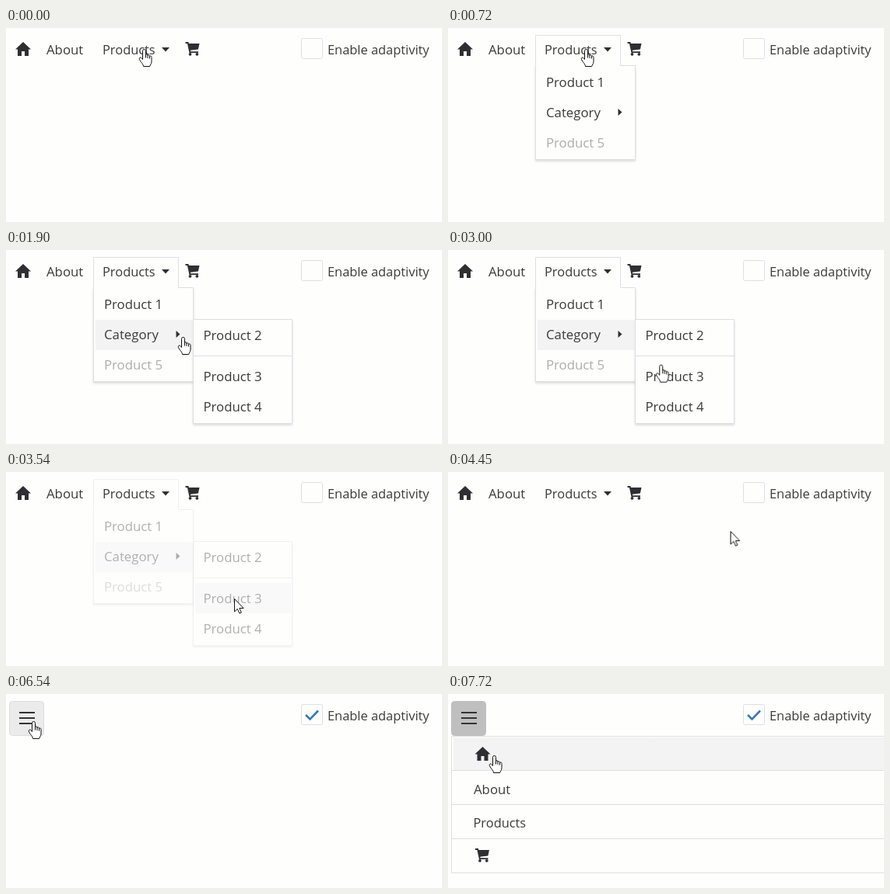
Recreate the animation shown at these times as an HTML page. Size 560 by 250 pixels, loop 8000 ms.

```html
<!DOCTYPE html>
<html lang="en">
<head>
<meta charset="utf-8">
<title>Adaptive menu</title>
<style>
html, body { margin: 0; width: 100%; height: 100%; overflow: hidden; background: #fefefd; }
svg { display: block; width: 560px; height: 250px; }
text { font: 16.8px "Open Sans", "Noto Sans", sans-serif; fill: #3a3a3a; }
.small { font-size: 16.4px; }
.icon { fill: #2f2f33; }
.line { fill: none; stroke: #dfdfe4; }
.panel { fill: #fefefd; stroke: #dfdfe4; }
.hover { fill: #f3f3f4; }
.muted { fill: #adadad; }
.shadow { filter: drop-shadow(0 2px 1.5px #0002); }

/* 1% of the loop is 80 ms */
.anim { animation: 8s linear infinite; }
.step { animation: 8s step-end infinite; }

#cursor { animation-name: travel; }
@keyframes travel {
  0%, 9% { transform: translate(177px, 27px); animation-timing-function: ease-in-out; }
  15.75%, 17.5% { transform: translate(193px, 85px); }
  20.25%, 32.875% { transform: translate(227px, 112px); }
  39.5%, 51.125% { transform: translate(293px, 163px); }
  57.875%, 71.5% { transform: translate(397px, 33px); animation-timing-function: ease-in-out; }
  79.5%, 86.9% { transform: translate(35px, 35px); animation-timing-function: ease-in-out; }
  90.6%, 100% { transform: translate(59px, 79px); }
}
#hand { animation-name: hand; }
@keyframes hand {
  0%, 57.5%, 79.1% { opacity: 1; }
  43.75%, 72% { opacity: 0; }
}
#arrow { animation-name: arrow; }
@keyframes arrow {
  0%, 57.5%, 79.1% { opacity: 0; }
  43.75%, 72% { opacity: 1; }
}

#popup { animation-name: popup; }
@keyframes popup {
  0%, 2.25%, 45%, 100% { opacity: 0; }
  6.25%, 43.125% { opacity: 1; }
}
#submenu { animation-name: submenu; }
@keyframes submenu {
  0%, 19.125%, 45%, 100% { opacity: 0; }
  23.125%, 43.125% { opacity: 1; }
}
#over1 { animation-name: over1; }
@keyframes over1 { 0%, 18% { opacity: 0; } 11.75% { opacity: 1; } }
#overCategory { animation-name: overCategory; }
@keyframes overCategory { 0%, 46% { opacity: 0; } 18% { opacity: 1; } }
#over2 { animation-name: over2; }
@keyframes over2 { 0%, 35.2% { opacity: 0; } 34.4% { opacity: 1; } }
#over3 { animation-name: over3; }
@keyframes over3 { 0%, 46% { opacity: 0; } 37.625% { opacity: 1; } }

#nav { animation-name: wide; }
@keyframes wide { 0% { opacity: 1; } 62.5%, 100% { opacity: 0; } }
#compact, #check { animation-name: narrow; }
@keyframes narrow { 0% { opacity: 0; } 62.5%, 100% { opacity: 1; } }
#focus { animation-name: focus; }
@keyframes focus { 0%, 72% { opacity: 0; } 57.5% { opacity: 1; } }

#burger { animation-name: burger; }
@keyframes burger {
  0% { fill: #fefefd; stroke: #dcdce0; }
  79.1% { fill: #ebebeb; stroke: #dcdce0; }
  83.75%, 100% { fill: #bfbfc0; stroke: #bfbfc0; }
}
#list { animation-name: unfold; }
@keyframes unfold {
  0%, 83.75% { clip-path: inset(0 0 100% 0); animation-timing-function: ease-out; }
  86.9%, 100% { clip-path: inset(0); }
}
#overHome { animation-name: overHome; }
@keyframes overHome { 0% { opacity: 0; } 88.75%, 100% { opacity: 1; } }
</style>
</head>
<body>
<svg viewBox="0 0 560 250">
  <defs>
    <path id="home" d="M10 0 20 9.5H17V18H12V12H8V18H3V9.5H0Z"/>
    <g id="cart">
      <path d="M0 0H3.8L4.4 2H18L16.4 9.5 6.3 10.8 6.6 12.2H16.5V14H5L2.4 2H0Z"/>
      <circle cx="6" cy="15.8" r="1.9"/>
      <circle cx="14.8" cy="15.8" r="1.9"/>
    </g>
  </defs>

  <g id="popup" class="anim">
    <path class="panel shadow" d="M112.5 48.5H240.5V169.5H112.5Z"/>
    <path class="panel" d="M112.5 50V9.5H221.5V48.5"/>
    <path d="M113 47H221V50H113Z" fill="#fefefd"/>
    <rect id="over1" class="hover step" x="115" y="51" width="124" height="39"/>
    <rect id="overCategory" class="hover step" x="115" y="90" width="124" height="39"/>
    <text x="126" y="75.5">Product 1</text>
    <text x="126" y="114.5">Category</text>
    <text class="muted" x="126" y="153.5">Product 5</text>
    <path class="icon" d="M218.5 104 223.5 108.5 218.5 113Z"/>
  </g>

  <g id="submenu" class="anim">
    <path class="panel shadow" d="M240.5 89.5H367.5V223.5H240.5Z"/>
    <rect id="over2" class="hover step" x="243" y="91" width="123" height="39"/>
    <rect id="over3" class="hover step" x="243" y="143" width="123" height="39"/>
    <path class="line" d="M241 136.5H367"/>
    <text x="253.5" y="115.5">Product 2</text>
    <text x="253.5" y="168.5">Product 3</text>
    <text x="253.5" y="207.5">Product 4</text>
  </g>

  <g id="nav" class="step">
    <use href="#home" class="icon" x="12" y="18"/>
    <text x="52" y="34">About</text>
    <text class="small" x="124" y="34">Products</text>
    <path class="icon" d="M200 25H210L205 30.5Z"/>
    <use href="#cart" class="icon" x="230.5" y="18"/>
  </g>

  <rect class="panel" x="379.5" y="13.5" width="27" height="26" rx="2"/>
  <rect id="focus" class="step" x="379.5" y="13.5" width="27" height="26" rx="2" fill="none" stroke="#337ab7"/>
  <path id="check" class="step" d="M385 27 390.5 32.5 401 21.5" fill="none" stroke="#337ab7" stroke-width="2.6"/>
  <text class="small" x="413" y="34">Enable adaptivity</text>

  <g id="compact" class="step">
    <g id="list" class="anim">
      <path class="panel" d="M570 54.5H4.5V230.5H570"/>
      <rect id="overHome" class="hover step" x="7" y="56" width="553" height="42"/>
      <path class="line" d="M5 98.5H560M5 142.5H560M5 186.5H560"/>
      <use href="#home" class="icon" x="34.5" y="68"/>
      <text x="33" y="128.5">About</text>
      <text class="small" x="32.5" y="172">Products</text>
      <use href="#cart" class="icon" x="35" y="199"/>
    </g>
    <rect id="burger" class="step" x="4.5" y="9.5" width="44" height="44" rx="4"/>
    <path d="M17 24H37M17 31H37M17 38H37" stroke="#333" stroke-width="2.2"/>
  </g>

  <g id="cursor" class="anim" fill="#fff" stroke="#111" stroke-linejoin="round">
    <g id="hand" class="step">
      <path d="M-1.5 13.5V2.5a2 2 0 0 1 4 0V8c0-1.8 2.5-1.8 2.5 0v1c0-1.6 2.5-1.6 2.5.2v.8c0-1.4 2.5-1.4 2.5.4V16c0 4-2 4-2.3 6.5H-.5c0-3-3.2-5-5-8.7-1.2-2.5 1.5-3.7 2.6-2.1Z"/>
      <path d="M2.5 8V11.5M5 9V12M7.5 10V12.5" fill="none"/>
    </g>
    <path id="arrow" class="step" d="M.5.5V17L4.3 13.4 6.9 19.2 9.3 18.1 6.8 12.5H12.1Z"/>
  </g>
</svg>
</body>
</html>
```
